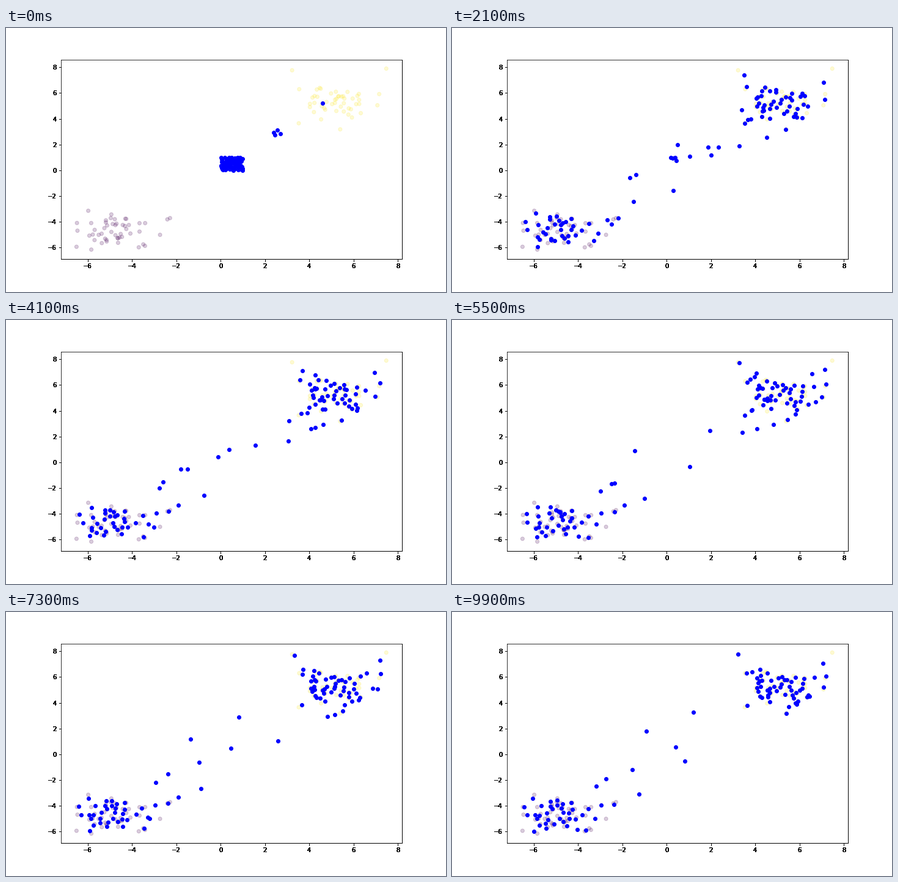
A matplotlib script for the animation above (10 s loop, 720 by 432 pixels).

```python
import numpy as np
import matplotlib.pyplot as plt
from matplotlib.animation import FuncAnimation

FRAMES = 100
SIDE = 10
XLIM, YLIM = (-7.2, 8.19), (-6.9, 8.594)
FIRST = np.array([4.6, 5.2])

rng = np.random.default_rng(3)


def cluster(center, spread, count, outliers):
    """A compact normal cloud plus a few stray points."""
    cloud = rng.normal(size=(4 * count, 2))
    cloud = cloud[np.abs(cloud).max(axis=1) < 1.7][:count]
    return np.vstack([np.array(center) + cloud * spread, outliers])


low = cluster((-4.95, -4.75), (0.92, 0.85), 43, [
    (-2.28, -3.72), (-2.4, -3.82), (-2.73, -5.02), (-3.41, -5.88),
    (-5.97, -3.15), (-6.48, -4.1), (-6.5, -5.95)])
high = cluster((5.1, 5.05), (0.8, 0.9), 42, [
    FIRST, (3.23, 7.77), (7.48, 7.9), (3.55, 6.3), (3.53, 3.65),
    (7.16, 5.92), (7.08, 5.05), (5.4, 3.18)])
data = np.vstack([low, high])
labels = np.repeat([0, 1], [len(low), len(high)])


def neighbours(i, j):
    cells = (i - 1, j), (i + 1, j), (i, j - 1), (i, j + 1)
    return [c for c in cells if 0 <= min(c) and max(c) < SIDE]


def pull(nodes, sample, rate, near):
    """Move the best matching node and its grid neighbours to the sample."""
    dist = ((nodes - sample) ** 2).sum(axis=2)
    best = np.unravel_index(dist.argmin(), dist.shape)
    nodes[best] += rate * (sample - nodes[best])
    for cell in neighbours(*best):
        nodes[cell] += near * (sample - nodes[cell])


def train():
    """Self-organising map: one sample first, then an epoch per frame."""
    nodes = rng.random((SIDE, SIDE, 2))
    nodes[4, 4] = 1, 1
    for cell, start in zip(neighbours(4, 4),
                           [(.2, .7), (.8, .5), (.3, .3), (.5, 1)]):
        nodes[cell] = start
    pull(nodes, FIRST, 1, 0.5)
    poses = [nodes.reshape(-1, 2).copy()]
    for k in range(1, FRAMES):
        rate = 0.45 + 0.55 * np.exp(-k / 15)
        near = 0.11 + 0.39 * np.exp(-k / 5)
        for sample in rng.permutation(data):
            pull(nodes, sample, rate, near)
        poses.append(nodes.reshape(-1, 2).copy())
    return poses


poses = train()

fig = plt.figure(figsize=(10, 6), dpi=72, facecolor="white")
fig.subplots_adjust(left=0.125, right=0.9, bottom=0.125, top=0.88)
ax = fig.add_subplot(xlim=XLIM, ylim=YLIM)
ax.scatter(*data.T, c=labels, cmap="viridis", alpha=0.2)
dots, = ax.plot([], [], "bo")

# Stacked transparent axes darken the labels, ticks and two frame sides.
for _ in range(9):
    layer = fig.add_axes(ax.get_position(), xlim=XLIM, ylim=YLIM,
                         facecolor="none")
    layer.spines[["left", "top"]].set_visible(False)


def update(k):
    dots.set_data(*poses[k].T)
    return dots,


anim = FuncAnimation(fig, update, frames=FRAMES, interval=100,
                     repeat=True, repeat_delay=0)
plt.show()
```
